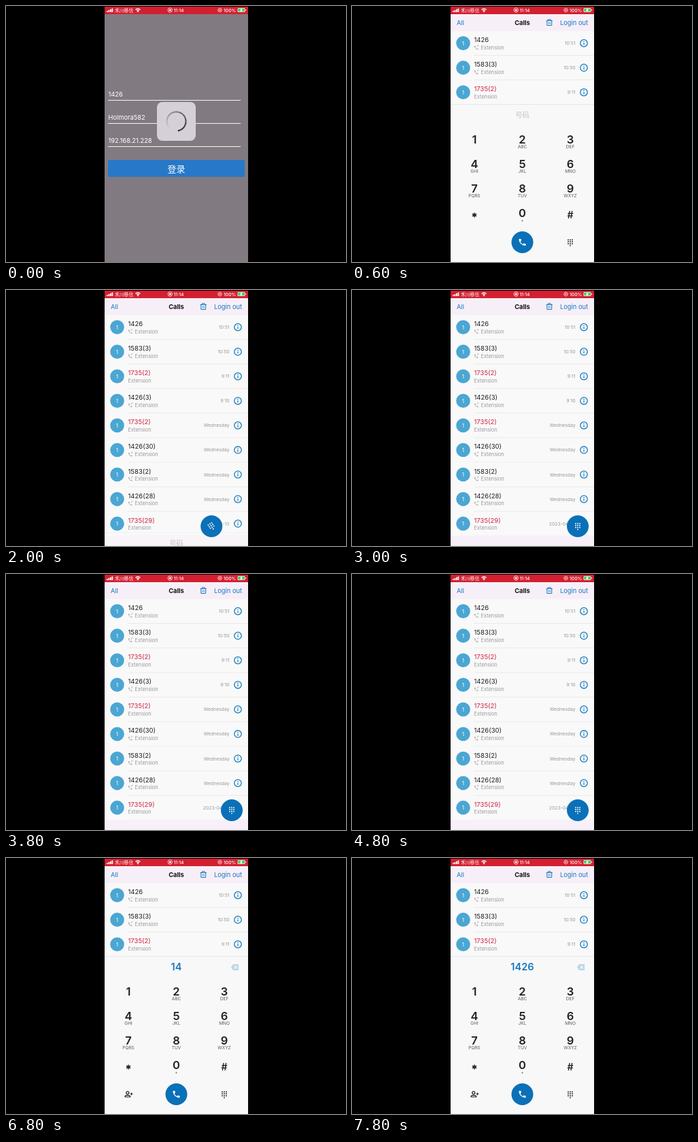
These frames come from a looping animation (500x376 px, 8000 ms). An HTML page with a canvas:

```html
<!DOCTYPE html>
<html lang="en">
<head>
<meta charset="utf-8">
<title>Softphone</title>
<style>
  html, body { margin: 0; width: 100%; height: 100%; overflow: hidden; background: #000; }
  canvas { display: block; width: 500px; height: 376px; }
</style>
</head>
<body>
<canvas id="stage"></canvas>
<script>
const LOOP = 8000, STEP = 200;
const LEFT = 145, RIGHT = 356, MID = 250.5;
const BLUE = '#1678be', RED = '#cc2742', INK = '#202124';
const FONT = 'Inter, "Noto Sans CJK SC", "Noto Sans CJK", sans-serif';
const LOGIN_END = 500;
const TYPED_AT = [6200, 6600, 6900, 7300];
const [ANN, BEN, CAY] = ['1426', '1583', '1735'];

const CALLS = [
  [ANN, '10:51'], [BEN + '(3)', '10:50'], [CAY + '(2)', '9:11', true],
  [ANN + '(3)', '9:10'], [CAY + '(2)', 'Wednesday', true], [ANN + '(30)', 'Wednesday'],
  [BEN + '(2)', 'Wednesday'], [ANN + '(28)', 'Wednesday'], [CAY + '(29)', '2023-04-13', true]
];
const KEYS = [
  ['1', ''], ['2', 'ABC'], ['3', 'DEF'], ['4', 'GHI'], ['5', 'JKL'], ['6', 'MNO'],
  ['7', 'PQRS'], ['8', 'TUV'], ['9', 'WXYZ'], ['*', ''], ['0', '+'], ['#', '']
];
const HANDSET = new Path2D('M6.6 10.8c1.4 2.8 3.8 5.1 6.6 6.6l2.2-2.2c.3-.3.7-.4 1-.2 1.1.4 2.3.6 3.6.6.6 0 1 .4 1 1V20c0 .6-.4 1-1 1C10.600 21 3 13.400 3 4c0-.6.4-1 1-1h3.500c.6 0 1 .4 1 1 0 1.200.2 2.400.6 3.600.1.300 0 .700-.2 1z');

const canvas = document.getElementById('stage');
const c = canvas.getContext('2d');
const scale = window.devicePixelRatio || 1;
canvas.width = 500 * scale;
canvas.height = 376 * scale;

const clamp = v => Math.min(1, Math.max(0, v));
const ease = v => v < .5 ? 4 * v ** 3 : 1 - 4 * (1 - v) ** 3;
const progress = (t, start, length) => ease(clamp((t - start) / length));

function rect(x, y, w, h, color, radius = 0) {
  c.fillStyle = color;
  c.beginPath();
  c.roundRect(x, y, w, h, radius);
  c.fill();
}

function disc(x, y, r, color) {
  c.fillStyle = color;
  c.beginPath();
  c.arc(x, y, r, 0, 2 * Math.PI);
  c.fill();
}

function arc(x, y, r, color, width, from = 0, to = 2 * Math.PI) {
  c.strokeStyle = color;
  c.lineWidth = width;
  c.beginPath();
  c.arc(x, y, r, from, to);
  c.stroke();
}

function line(color, width, ...points) {
  c.strokeStyle = color;
  c.lineWidth = width;
  c.beginPath();
  for (const [x, y] of points) c.lineTo(x, y);
  c.stroke();
}

function text(string, x, y, size, color, align = 'left', weight = 400) {
  c.font = `${weight} ${size}px ${FONT}`;
  c.fillStyle = color;
  c.textAlign = align;
  c.fillText(string, x, y);
}

function at(x, y, draw) {
  c.save();
  c.translate(x, y);
  draw();
  c.restore();
}

function handset(x, y, size, color) {
  at(x, y, () => {
    c.scale(size / 18, size / 18);
    c.translate(-12, -12);
    c.fillStyle = color;
    c.fill(HANDSET);
  });
}

function dialDots(x, y, color) {
  for (let i = 0; i < 10; i++) {
    const column = i < 9 ? i % 3 - 1 : 0;
    disc(x + column * 3, y - 4.1 + Math.floor(i / 3) * 2.9, .95, color);
  }
}

function statusBar() {
  rect(LEFT, 1, RIGHT - LEFT, 11, '#d41f30');
  for (let i = 0; i < 4; i++) rect(148 + i * 2.5, 7.2 - i * 1.2, 1.8, 1.8 + i * 1.2, '#fff');
  text('禾川移信', 160, 8.6, 6.8, '#fff', 'left', 500);
  for (const r of [2.6, 5]) arc(194, 9, r, '#fff', 1.3, -2.35, -.79);
  disc(194, 8.3, 1, '#fff');
  arc(241.300, 6, 3.2, '#fff', .8);
  disc(241.300, 6, 1.6, '#fff');
  text('11:14', 246.5, 8.500, 6.8, '#fff', 'left', 500);
  arc(314.500, 6, 2.700, '#fff', .8);
  disc(314.500, 6, 1, '#fff');
  text('100%', 320, 8.500, 6.8, '#fff', 'left', 500);
  rect(340.500, 3, 11, 6, '#fff', 1.500);
  rect(341.200, 3.700, 9.600, 4.600, '#45c75a', 1);
  line('#fff', 1.100, [346.800, 3.500], [345, 6.200], [347, 5.800], [345.300, 8.500]);
  rect(352.100, 5, 1, 2, '#fff', .5);
}

function loginScreen(t) {
  rect(LEFT, 1, RIGHT - LEFT, 375, '#827a81');
  ['1426', 'Holmora582', '192.168.21.228'].forEach((value, i) => {
    text(value, 150.5, 133 + i * 34, 9.3, '#fff');
    rect(150, 138 + i * 34, 195, 1, '#f4f2f4');
  });
  rect(150, 226, 201, 25, '#2778c8', 2);
  text('登录', MID, 243.5, 13, '#fff', 'center');

  rect(222, 141, 57, 57, '#d5d0d7', 8);
  const head = 1.4 + t / 1000 * 2 * Math.PI, parts = 60, sweep = 5.3;
  for (let i = 0; i < parts; i++) {
    const from = head - sweep * (1 - i / parts);
    arc(250.5, 169.5, 14, `rgba(12,14,24,${(i + 1) / parts})`, 2, from, from + sweep / parts);
  }
}

function header() {
  rect(LEFT, 12, RIGHT - LEFT, 25, '#f7eff8');
  text('All', 154, 27.5, 9.3, BLUE);
  text('Calls', MID, 27.5, 9.3, '#111', 'center', 700);
  text('Login out', 347, 27.5, 9.3, BLUE, 'right');
  line(BLUE, 1, [285.7, 21.5], [294.8, 21.5]);
  line(BLUE, 1, [288.3, 21], [288.3, 19.8], [292.2, 19.8], [292.2, 21]);
  line(BLUE, 1, [286.8, 21.5], [286.8, 28.5], [293.7, 28.5], [293.7, 21.5]);
  for (const x of [289.2, 291.300]) line(BLUE, .8, [x, 23.500], [x, 26.700]);
}

function callRow([name, when, missed], i) {
  const y = 54.6 + i * 36.07;
  disc(163.5, y, 10.3, '#4ba6d3');
  text('1', 163.5, y + 2.9, 8, '#fff', 'center');
  text(name, 179.5, y - 1.5, 9.5, missed ? RED : INK);
  text('Extension', missed ? 179.500 : 189.500, y + 9, 7.4, '#9b999d');
  if (!missed) {
    handset(182.800, y + 6.700, 5.500, '#aaa8ac');
    line('#aaa8ac', .7, [183.500, y + 5.500], [186.300, y + 3.300], [184.300, y + 3.300]);
  }
  text(when, 328.5, y + 2.5, 6.8, '#98969a', 'right');
  arc(341, y, 5.2, BLUE, 1.3);
  rect(340.4, y - .7, 1.2, 3.4, BLUE);
  disc(341, y - 2.400, .8, BLUE);
  rect(179.500, y + 17.700, RIGHT - 179.500, .7, '#e6e4e8');
}

function addContactIcon(x, y) {
  arc(x - 1.2, y - 2.2, 2, INK, 1.2);
  line(INK, 1.2, [x - 5, y + 4], [x - 5, y + 2.6], [x - 3, y + 1.6], [x + .6, y + 1.6],
    [x + 2.6, y + 2.6], [x + 2.6, y + 4], [x - 5, y + 4]);
  line(INK, 1.1, [x + 2.6, y - .5], [x + 6.4, y - .5]);
  line(INK, 1.1, [x + 4.5, y - 2.4], [x + 4.5, y + 1.4]);
}

function deleteIcon(x, y) {
  c.fillStyle = '#b9d7ea';
  c.beginPath();
  for (const [dx, dy] of [[-5.5, 0], [-2.5, -4.5], [5.5, -4.5], [5.5, 4.5], [-2.5, 4.5]]) c.lineTo(x + dx, y + dy);
  c.fill();
  for (const d of [-1, 1]) line('#f8f8f8', 1.1, [x - .8, y - 2 * d], [x + 3.2, y + 2 * d]);
}

function keypad(closed, typed) {
  if (closed === 1) return;
  at(0, closed * 231, () => {
    c.globalAlpha = 1 - closed ** 6;
    rect(LEFT, 145, RIGHT - LEFT, 231, '#f8f8f8');
    rect(LEFT, 144.3, RIGHT - LEFT, .8, '#dfe4ea');
    c.globalAlpha = 1;
    if (typed) {
      text(typed, MID, 165.4, 14.6, BLUE, 'center', 600);
      deleteIcon(336.5, 160.5);
      addContactIcon(180, 347);
    } else {
      text('号码', MID, 164, 10.3, '#c3c0c6', 'center');
    }
    KEYS.forEach(([key, letters], i) => {
      const x = 180 + i % 3 * 70.5, y = 196 + Math.floor(i / 3) * 36;
      if (key === '*') {
        for (let k = 0; k < 3; k++) {
          const a = Math.PI / 2 + k * Math.PI / 3, dx = 3.5 * Math.cos(a), dy = 3.5 * Math.sin(a);
          line(INK, 1.5, [x - dx, 307 - dy], [x + dx, 307 + dy]);
        }
      } else {
        text(key, x, key === '#' ? 312 : y + 5.8, key === '#' ? 14 : 16.5, INK, 'center', 600);
      }
      text(letters, x, y + 12.700, 6.5, '#5c5a5f', 'center');
    });
    dialDots(321, 347.500, INK);
  });
}

function callButton(slide) {
  const x = MID + slide * 81.5, y = 347;
  disc(x, y, 16, '#0a70b8');
  at(x, y, () => {
    c.rotate(slide * Math.PI / 2);
    c.globalAlpha = clamp(1 - slide * 2);
    handset(0, 0, 10, '#fff');
  });
  at(x, y, () => {
    c.rotate((slide - 1) * Math.PI / 2);
    c.globalAlpha = clamp(slide * 2 - .2);
    dialDots(0, 0, '#fff');
  });
}

function callsScreen(t) {
  rect(LEFT, 1, RIGHT - LEFT, 375, '#f9f9f9');
  CALLS.forEach(callRow);
  rect(LEFT, 361, RIGHT - LEFT, 15, '#f7f0f8');
  header();
  const closed = progress(t, 1710, 400) - progress(t, 5150, 400);
  const slide = progress(t, 1850, 273) - progress(t, 5150, 350);
  const typed = ANN.slice(0, TYPED_AT.filter(moment => t >= moment).length);
  keypad(closed, typed);
  callButton(slide);
}

function render(now) {
  const t = Math.floor(now % LOOP / STEP) * STEP;
  c.setTransform(scale, 0, 0, scale, 0, 0);
  rect(0, 0, 500, 376, '#000');
  c.save();
  c.beginPath();
  c.rect(LEFT, 1, RIGHT - LEFT, 375);
  c.clip();
  (t < LOGIN_END ? loginScreen : callsScreen)(t);
  statusBar();
  c.restore();
}

let start;
function tick(now) {
  start ??= now;
  render(now - start);
  requestAnimationFrame(tick);
}
render(0);
requestAnimationFrame(tick);
</script>
</body>
</html>
```
